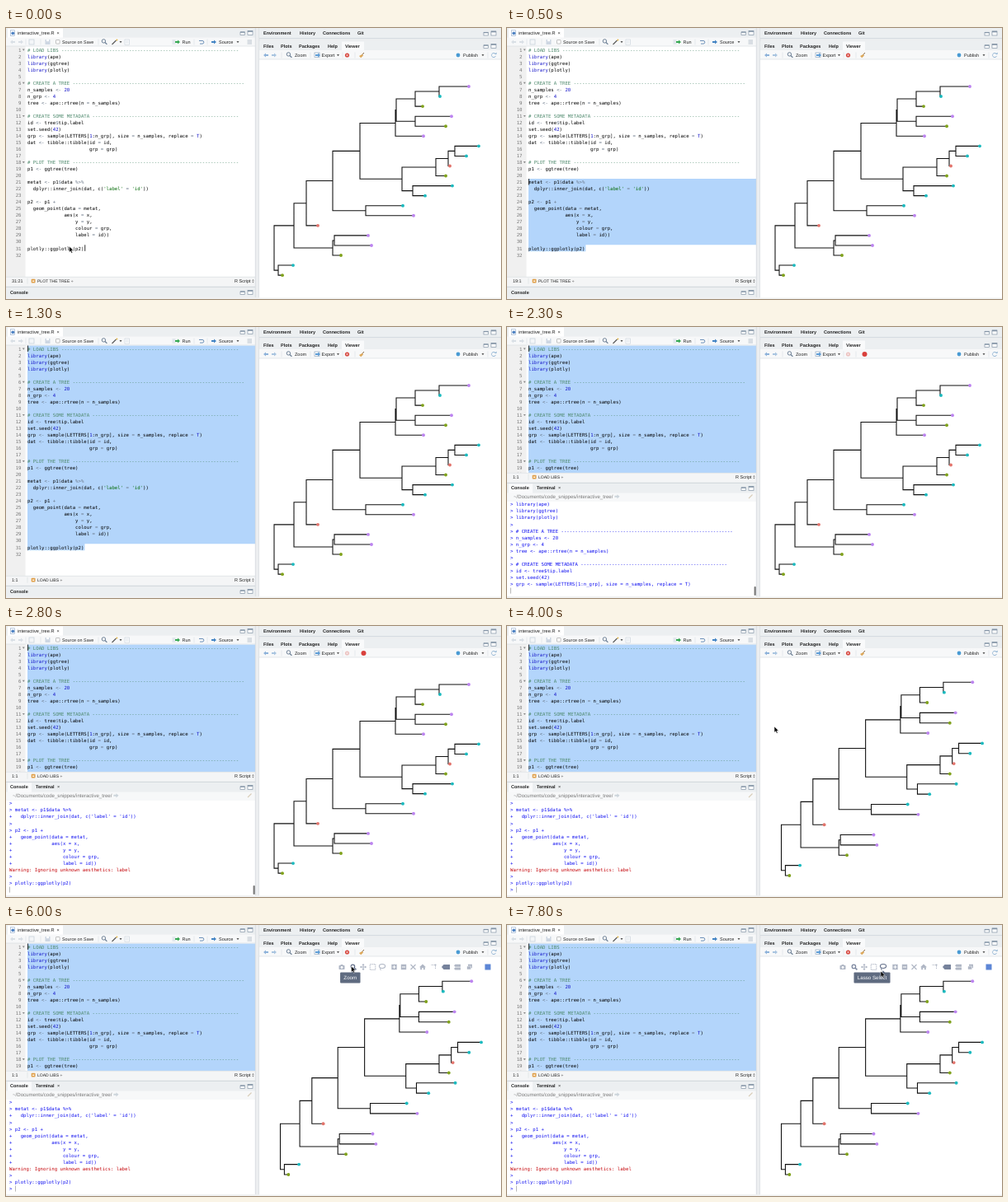
Recreate the animation shown at these times as an HTML page. Size 600 px wide and 329 px high, loop 8 s.

```html
<!DOCTYPE html>
<html lang="en">
<head>
<meta charset="utf-8">
<title>Interactive tree in an IDE</title>
<style>
  html, body { margin: 0; width: 100%; height: 100%; overflow: hidden; background: #eceef0; }
  svg { display: block; width: 100vw; height: 100vh; }
  text { white-space: pre; text-rendering: geometricPrecision; font: 5.5px "Liberation Sans", Arial, sans-serif; fill: #222; }
  .bold { font-weight: bold; }
  .code { font: 5.68px "DejaVu Sans Mono", monospace; fill: #000; }
  .num { fill: #777; text-anchor: end; }
</style>
</head>
<body>
<svg id="stage" viewBox="0 0 600 329" xmlns="http://www.w3.org/2000/svg"></svg>
<script>
const LOOP = 8000;
const LINE = 8.03, CHAR = 3.42, CODE_X = 26;
const BAR = '#eceff1', TOOLBAR = '#f7f8f9', BORDER = '#d5dade';
const dashes = (title, length) => `# ${title} `.padEnd(length, '-');
const pad = (n, s) => ' '.repeat(n) + s;

const code = [
  dashes('LOAD LIBS', 75), 'library(ape)', 'library(ggtree)', 'library(plotly)', '',
  dashes('CREATE A TREE', 77), 'n_samples <- 20', 'n_grp <- 4', 'tree <- ape::rtree(n = n_samples)', '',
  dashes('CREATE SOME METADATA', 75), 'id <- tree$tip.label', 'set.seed(42)',
  'grp <- sample(LETTERS[1:n_grp], size = n_samples, replace = T)',
  'dat <- tibble::tibble(id = id,', pad(22, 'grp = grp)'), '',
  dashes('PLOT THE TREE', 75), 'p1 <- ggtree(tree)', '',
  'metat <- p1$data %>%', "  dplyr::inner_join(dat, c('label' = 'id'))", '',
  'p2 <- p1 +', '  geom_point(data = metat,', pad(13, 'aes(x = x,'), pad(17, 'y = y,'),
  pad(17, 'colour = grp,'), pad(17, 'label = id))'), '', 'plotly::ggplotly(p2)', ''
];

const transcript = code.slice(0, 31).flatMap((line, i) => {
  const echo = (line[0] === ' ' ? '+ ' : '> ') + line;
  return i === 28 ? [echo, 'Warning: Ignoring unknown aesthetics: label'] : [echo];
});

// ---- markup helpers ----
const esc = s => s.replace(/&/g, '&amp;').replace(/</g, '&lt;').replace(/>/g, '&gt;');
const text = (x, y, s, attrs = '') => `<text x="${x}" y="${y}" ${attrs}>${esc(s)}</text>`;
const rect = (x, y, w, h, fill, attrs = '') => `<rect x="${x}" y="${y}" width="${w}" height="${h}" fill="${fill}" ${attrs}/>`;
const dot = (x, y, r, fill, attrs = '') => `<circle cx="${x}" cy="${y}" r="${r}" fill="${fill}" ${attrs}/>`;
const line = (d, stroke = '#8796a8', w = 0.8, attrs = '') => `<path d="${d}" fill="none" stroke="${stroke}" stroke-width="${w}" ${attrs}/>`;
const group = (id, body, attrs = '') => `<g id="${id}" ${attrs}>${body}</g>`;
const caretDown = (x, y, fill = '#555') => `<path d="M${x - 1.5} ${y - 1}h3l-1.5 2.2z" fill="${fill}"/>`;
const arrow = (x, y, dir, fill) => `<path d="M${x + 3 * dir} ${y}l${-3 * dir} -2.6v1.6h${-3 * dir}v2h${3 * dir}v1.6z" fill="${fill}"/>`;
const separator = (x, y) => line(`M${x} ${y - 3.5}v7`, '#d8dde2', 0.6);
const magnifier = (x, y, c, w = 1) => line(`M${x + 1} ${y + 1}l2.4 2.4`, c, w * 1.3) + dot(x - 0.6, y - 0.6, 2.2, 'none', `stroke="${c}" stroke-width="${w}"`);
const windowButtons = (x, y) =>
  rect(x - 3, y - 1, 5.5, 3.5, '#fff', 'stroke="#8494a6" stroke-width=".7"') + rect(x - 3, y - 1.6, 5.5, 1.3, '#8494a6') +
  rect(x + 6, y - 2.5, 6, 5, '#fff', 'stroke="#8494a6" stroke-width=".7"') + rect(x + 6, y - 2.8, 6, 1.6, '#8494a6');

const tokenColour = t =>
  t[0] === '#' ? '#4c886b' : t[0] === "'" ? '#036a07' : /^(library|T|\d+)$/.test(t) ? '#1414c8' : '#687687';
const highlight = s => esc(s).replace(/^#.*|'[^']*'|\b(?:library|T|\d+)\b|&lt;-|%&gt;%|[=+$]/g,
  t => `<tspan fill="${tokenColour(t)}">${t}</tspan>`);

// ---- editor ----
const baseline = n => 28.6 + (n - 1) * LINE;

function editor() {
  const folds = [1, 6, 11, 18];
  const rows = code.map((s, i) =>
    `<text class="code" x="${CODE_X}" y="${baseline(i + 1)}">${highlight(s)}</text>` +
    text(18.5, baseline(i + 1), String(i + 1), 'class="code num" style="fill:#777"')).join('');
  return rect(0, 22, 302, 281, '#fff') + rect(0, 22, 23.5, 281, '#f0f0f0') +
    '<path id="selection" fill="#b3d5fb"/>' + rows +
    folds.map(n => caretDown(21.3, baseline(n) - 2, '#888')).join('') +
    rect(CODE_X, 0, 0.8, 7.5, '#000', 'id="caret"');
}

function editorChrome() {
  return rect(0, 0, 302, 11.5, BAR) + rect(2, 0.5, 67, 11.5, '#fff') +
    rect(5.5, 2.8, 5, 6.5, '#fff', 'stroke="#8da5c5" stroke-width=".6"') + dot(8.3, 6.3, 1.9, '#4f83c4') +
    text(14, 8, 'interactive_tree.R', 'style="font-size:5.7px"') + text(61.5, 8, '×', 'fill="#666"') +
    windowButtons(287, 6) +
    rect(0, 11.5, 302, 10.5, TOOLBAR) + line('M0 22H302', BORDER, 0.6) +
    arrow(8, 17, -1, '#d9dfe5') + arrow(18, 17, 1, '#d9dfe5') + separator(24, 17) +
    rect(28, 14, 6, 6, '#f4f6f8', 'stroke="#c3ced8" stroke-width=".7"') + separator(42, 17) +
    rect(47.5, 14, 6, 6, '#cdd6e2') + rect(49, 14, 3, 2.2, '#fff') +
    rect(60.5, 14.5, 4.6, 4.6, '#fff', 'stroke="#999" stroke-width=".6" rx=".6"') + text(68, 18.8, 'Source on Save', 'style="font-size:5.4px"') +
    separator(112, 17) + magnifier(119, 16.5, '#6c7f95') +
    line('M128.5 20l5 -5', '#555', 1.1) + dot(134.4, 14.5, 1, '#e6b84a') + caretDown(139, 17) +
    rect(144, 14, 5.5, 6.2, '#fff', 'stroke="#c3ced8" stroke-width=".6"') + line('M145 16h3.5M145 18h3.5', '#c3ced8', 0.6) +
    rect(201.5, 14, 4, 6, '#e2e7ec') + arrow(208, 17, 1, '#36a852') + text(213.5, 18.8, 'Run') +
    separator(228, 17) + line('M234 15.5h4a1.8 1.8 0 0 1 0 3.6h-3', '#6b8fb8', 1) + separator(244, 17) +
    arrow(252, 17, 1, '#4384c4') + text(258, 18.8, 'Source') + caretDown(281, 17) +
    line('M292.5 15h5.5M292.5 17h5.5M292.5 19h5.5', '#a9b5c1', 0.8);
}

const statusBar = () => rect(0, 0, 302, 11, '#f4f5f6') + line('M0 .3H302', BORDER, 0.6) +
  text(7, 7.1, '', 'id="position" style="font-size:5.4px"') + separator(26, 5.2) +
  rect(30.7, 2.8, 4.8, 4.8, '#e0a04a', 'rx=".8"') + rect(32, 4.6, 2.2, 1.3, '#fff') +
  text(38, 7.1, '', 'id="section" style="font-size:5.05px"') +
  text(277, 7.1, 'R Script') + `<path d="M298.2 4.7l1.2-1.8 1.2 1.8zM298.2 5.7l1.2 1.8 1.2-1.8z" fill="#777"/>`;

const consolePane = () => rect(0, -1, 302, 2, BORDER) + rect(0, 0, 302, 12, BAR) +
  text(5, 8, 'Console', 'class="bold" id="collapsedTitle"') + windowButtons(287, 6) +
  group('consoleBody',
    rect(2, 0.5, 29, 11.8, '#f9fafb') + text(5, 7.3, 'Console', 'class="bold"') +
    text(36, 7.3, 'Terminal', 'class="bold"') + text(62, 7.3, '×', 'fill="#777"') +
    rect(0, 11.5, 302, 10.5, TOOLBAR) + text(8, 17.9, '~/Documents/code_snippes/interactive_tree/', 'style="font-size:6.1px;fill:#777"') +
    arrow(133.5, 15.8, 1, '#ccd4db') + line('M293 18l4.5-4.5', '#d8cdb8', 1.1) +
    rect(0, 22, 302, 115, '#fff') + group('output', '') + rect(299.6, 125, 2.2, 11, '#777', 'rx="1.1" id="thumb"'));

// ---- viewer ----
function viewerChrome() {
  const tabs = (y, items) => items.map(([x, s]) => text(x, y, s, 'class="bold"')).join('');
  return rect(307, 0, 293, 12.5, BAR) + line('M307 12.6H600', '#cfd5db', 0.8) +
    tabs(8, [[312, 'Environment'], [356, 'History'], [384, 'Connections'], [426, 'Git']]) + windowButtons(582, 6.5) +
    rect(307, 16, 293, 311.5, '#fff') + rect(307, 16, 293, 11, BAR) + rect(407, 16.5, 27, 11, '#f9fafb') +
    tabs(23.9, [[312, 'Files'], [333, 'Plots'], [355, 'Packages'], [390, 'Help'], [411, 'Viewer']]) + windowButtons(582, 22) +
    rect(307, 27, 293, 11, TOOLBAR) + line('M307 38H600', BORDER, 0.6) +
    arrow(315, 33, -1, '#8db2da') + arrow(325, 33, 1, '#a9c4e0') + separator(334, 33) +
    magnifier(343, 32.5, '#6c7f95') + text(350, 35, 'Zoom') + separator(369, 33) +
    rect(374, 30, 6, 5.5, '#fff', 'stroke="#8fa5bd" stroke-width=".7"') + arrow(378, 33, 1, '#5b9bd5') +
    text(382.5, 35, 'Export') + caretDown(402.5, 33) + separator(408, 33) +
    group('remove', dot(413.5, 33, 2.6, '#d6453d') + line('M412.3 31.8l2.4 2.4M414.7 31.8l-2.4 2.4', '#fff', 0.7)) + separator(423, 33) +
    group('broom', line('M434 30l-3 3.2', '#8a6a45', 1) + '<path d="M431.6 32l-3.6 2 2.2 2.3 3-3z" fill="#dca85a"/>') +
    group('stop', dot(433.5, 33, 3, '#d9403c')) +
    dot(548, 33, 2.4, '#4a9bd4') + text(554, 35, 'Publish') + caretDown(578, 33) + separator(584, 33) +
    line('M593 31.2a2.6 2.6 0 1 0 .6 2.6', '#8fb3d3', 0.9) + '<path d="M592 32h2.6v-2.6z" fill="#8fb3d3"/>';
}

// Inner nodes are [x, upper, lower]; tips are plain x positions, top to bottom.
const tree = [325,
  [349,
    [364,
      [396,
        [429,
          [472, [473, [496, [525, 561, 526], 505], [496, 540, 533]], 506],
          [480, [521, [536, [544, 573, 558], 538], 533], [493, 541, 508]]],
        [436, 481, 494]],
      378],
    [396, [398, 439, 443], 406]],
  [330, 348, 335]];
const tipGroups = 'ptgpgpttrgtttprppgtg';
const palette = { r: '#e2746c', g: '#80a21c', t: '#1cbabf', p: '#bd85f0' };

function drawTree(mapX, top, step) {
  let tip = 0, path = '', dots = '';
  const place = node => {
    if (!Array.isArray(node)) {
      const x = mapX(node), y = top + tip * step;
      dots += dot(x, y, 1.95, palette[tipGroups[tip++]]);
      return { x, y };
    }
    const x = mapX(node[0]), a = place(node[1]), b = place(node[2]);
    path += `M${a.x} ${a.y}H${x}V${b.y}H${b.x}`;
    return { x, y: (a.y + b.y) / 2 };
  };
  place(tree);
  return line(path, '#111', 1.08, 'stroke-linecap="square"') + dots;
}

// ---- plot toolbar ----
const barIcons = {
  camera: [407, rect(-3.5, -2, 7, 5, 'currentColor', 'rx=".8"') + rect(-1.5, -3, 3, 2, 'currentColor') + dot(0, 0.5, 1.4, '#fff')],
  zoom: [421, magnifier(0, 0, 'currentColor', 1.3)],
  pan: [433, line('M-3.5 0h7M0 -3.5v7', 'currentColor', 1) + '<path d="M-4 0l2-1.6v3.2zM4 0l-2-1.6v3.2zM0-4l1.6 2h-3.2zM0 4l1.6-2h-3.2z" fill="currentColor"/>'],
  box: [444.5, rect(-3.3, -3.3, 6.6, 6.6, 'none', 'stroke="currentColor" stroke-dasharray="1.4 .8"')],
  lasso: [456, '<ellipse cx="0" cy="-1" rx="3.6" ry="2.5" fill="none" stroke="currentColor" stroke-width="1.1"/>' + line('M-2 1q-1 1.5.5 3', 'currentColor', 1)],
  plus: [470.5, rect(-3.2, -3.2, 6.4, 6.4, 'currentColor') + line('M-2 0h4M0 -2v4', '#fff', 1)],
  minus: [482, rect(-3.2, -3.2, 6.4, 6.4, 'currentColor') + line('M-2 0h4', '#fff', 1)],
  autoscale: [493.5, line('M-3 -3l6 6M3 -3l-6 6', 'currentColor', 1.2)],
  home: [505, '<path d="M-4 .3L0-3.5 4 .3H2.8v3H.9V1H-.9v2.3h-1.9v-3z" fill="currentColor"/>'],
  spikes: [518.5, line('M-3 -2.5h5v5', 'currentColor', 1, 'stroke-dasharray="1 .7"') + dot(2, -2.5, 1.1, 'currentColor')],
  closest: [533, '<path d="M-5 0l2.5-3H5v6h-7.5z" fill="currentColor"/>'],
  compare: [547, '<path d="M-4 -1.8l1.5-1.5H4v3h-6.5zM-4 2l1.5-1.5H4v3h-6.5z" fill="currentColor"/>'],
  copy: [562, rect(-2, -3.3, 5, 4.5, 'currentColor') + rect(-3.3, -1, 5, 4, 'currentColor', 'stroke="#fff" stroke-width=".5"')],
  maker: [584, rect(-3.5, -3.5, 7, 7, 'currentColor')]
};
const baseTint = { zoom: '#7d88a0', closest: '#76829b', maker: '#5d86d6' };
const modebar = () => Object.entries(barIcons).map(([name, [x, body]]) =>
  group('icon-' + name, body, `transform="translate(${x} 51)"`)).join('') +
  group('tip', `<path id="tipArrow" fill="#5f6b80"/>` + rect(0, 57.6, 10, 12.8, '#5f6b80', 'id="tipBox" rx="1"') +
    text(0, 66.2, '', 'id="tipText" style="font-size:6.2px;fill:#fff;text-anchor:end"'));

const stage = document.getElementById('stage');
stage.innerHTML =
  '<clipPath id="editorClip"><rect id="editorArea" y="22" width="302"/></clipPath>' +
  rect(0, 0, 600, 329, '#eceef0') +
  group('editor', editor(), 'clip-path="url(#editorClip)"') + editorChrome() +
  group('status', statusBar()) + group('console', consolePane()) + rect(0, 327, 600, 2, '#f0f1f2') +
  line('M302.3 0V327M306.8 0V327', '#d3d8dd', 0.7) + viewerChrome() +
  group('ggplot', drawTree(x => x, 71, 12.06)) +
  group('widget', drawTree(x => 332.5 + (x - 325) * 0.982, 68.3, 12.35)) +
  group('modebar', modebar()) +
  group('cursor', '<path d="M0 0v7.2l1.7-1.5 1.2 2.6 1.3-.5-1.2-2.6h2.3z" fill="#000" stroke="#fff" stroke-width=".5"/>');
const el = id => document.getElementById(id);

// ---- timeline: each entry overrides what came before it ----
const timeline = [
  [0, { from: 0, pos: '31:21', section: 'PLOT THE TREE', mouse: [76.5, 265], plot: 'ggplot' }],
  [300, { from: 27, pos: '27:1' }],
  [500, { from: 21, pos: '19:1', mouse: null }],
  [800, { from: 12, pos: '11:1', section: 'CREATE SOME METADATA' }],
  [1000, { from: 2, pos: '2:1', section: 'LOAD LIBS' }],
  [1300, { from: 1, pos: '1:1' }],
  [2300, { echoed: 14, busy: true }],
  [2500, { echoed: 20 }],
  [2800, { echoed: transcript.length }],
  [3300, { plot: '', busy: false }],
  [3800, { plot: 'widget' }],
  [4000, { mouse: [324, 122] }],
  [4300, { mouse: [345, 108], bar: true }],
  [4500, { mouse: [368, 90] }],
  [4800, { mouse: [388, 74] }],
  [5000, { mouse: [398, 63] }],
  [5300, { mouse: [405, 55], hover: 'camera', tip: 'Download plot as a png' }],
  [5500, { mouse: [407, 52] }],
  [5800, { mouse: [416, 51], hover: 'zoom', tip: 'Zoom' }],
  [6000, { mouse: [418.5, 50] }],
  [6500, { mouse: [424, 52] }],
  [6800, { mouse: [432, 53], hover: 'pan', tip: 'Pan' }],
  [7000, { mouse: [438, 54] }],
  [7300, { mouse: [444, 55], hover: 'box', tip: 'Box Select' }],
  [7500, { mouse: [451, 55], hover: 'lasso', tip: 'Lasso Select' }],
  [7800, { mouse: [453, 56] }]
];
const stateAt = t => Object.assign({}, ...timeline.filter(([start]) => start <= t).map(([, change]) => change));
const show = (id, on) => el(id).setAttribute('display', on ? 'inline' : 'none');
const moveTo = (id, x, y) => el(id).setAttribute('transform', `translate(${x} ${y})`);

function drawConsole(count, busy) {
  const rows = transcript.slice(0, count).concat(busy ? '' : '> ').slice(-14);
  const first = 14 - rows.length;
  el('output').innerHTML = rows.map((s, i) => text(4, 27.3 + (i + first) * 8.07, s,
    `class="code" style="fill:${s.startsWith('Warning') ? '#c5060b' : '#1010f0'}"`)).join('') +
    rect(busy ? 4.3 : 11, 126.6, 0.6, 7, '#888');
}

function drawTip(name, label) {
  show('tip', !!label);
  if (!label) return;
  const x = barIcons[name][0], right = x + 8.5;
  el('tipText').textContent = label;
  el('tipText').setAttribute('x', right - 4.3);
  const width = el('tipText').getComputedTextLength() + 8.6;
  el('tipBox').setAttribute('x', right - width);
  el('tipBox').setAttribute('width', width);
  el('tipArrow').setAttribute('d', `M${x - 2.5} 58h5l-2.5-2.6z`);
}

function render(t) {
  const s = stateAt(t), split = !!s.echoed;
  el('editorArea').setAttribute('height', split ? 155 : 281);
  moveTo('status', 0, split ? 177 : 302);
  moveTo('console', 0, split ? 190 : 315);
  show('consoleBody', split);
  show('collapsedTitle', !split);
  if (split) drawConsole(s.echoed, s.busy);
  show('thumb', s.busy);

  const top = n => baseline(n) - 6.2, endX = CODE_X + 20 * CHAR + 1;
  el('selection').setAttribute('d', s.from ? `M${CODE_X} ${top(s.from)}H302V${top(31)}H${endX}V${top(32)}H${CODE_X}z` : '');
  el('caret').setAttribute('x', s.from ? CODE_X : endX);
  el('caret').setAttribute('y', top(s.from || 31));
  el('position').textContent = s.pos;
  el('section').textContent = s.section + ' ÷';

  show('ggplot', s.plot === 'ggplot');
  show('widget', s.plot === 'widget');
  show('stop', s.busy);
  show('broom', !s.busy);
  el('remove').setAttribute('opacity', s.busy ? 0.3 : 1);

  show('modebar', s.bar);
  for (const name in barIcons)
    el('icon-' + name).setAttribute('color', name === s.hover ? '#66728c' : baseTint[name] || '#b0b7c5');
  drawTip(s.hover, s.tip);
  show('cursor', s.mouse);
  if (s.mouse) moveTo('cursor', ...s.mouse);
}

const start = performance.now();
function tick() {
  render((performance.now() - start) % LOOP);
  requestAnimationFrame(tick);
}
tick();
</script>
</body>
</html>
```
